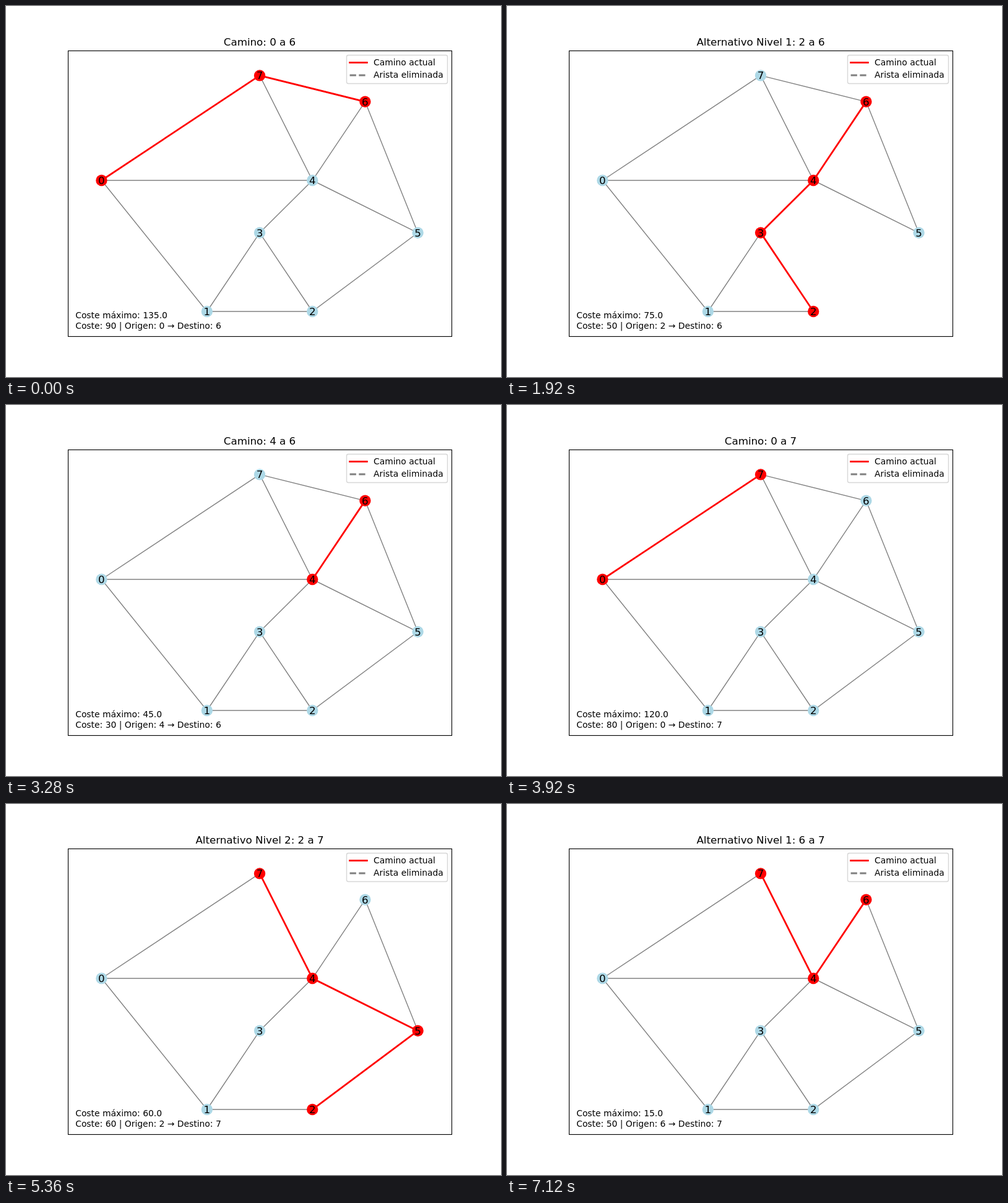
Animation of 800x600 px, one loop 7.2 s. Source, as an HTML page:

```html
<!DOCTYPE html>
<html lang="es">
<head>
<meta charset="utf-8">
<title>Caminos alternativos</title>
<style>
  html, body { margin: 0; width: 100%; height: 100%; overflow: hidden; background: #fff; }
  svg { display: block; width: 800px; height: 600px; }
  text { font-family: "DejaVu Sans", sans-serif; font-size: 13.89px; fill: #000; white-space: pre; }
  .big { font-size: 16.67px; text-anchor: middle; }
  .edge { stroke: #808080; stroke-width: 1.39; }
  .edge.on { stroke: #f00; stroke-width: 2.78; stroke-linecap: square; }
  .node { fill: #add8e6; }
  .node.on { fill: #f00; }
</style>
</head>
<body>
<svg id="stage" viewBox="0 0 800 600" xmlns="http://www.w3.org/2000/svg">
  <rect width="800" height="600" fill="#fff"/>
  <g id="edges"></g>
  <g id="nodes"></g>
  <rect x="100.5" y="72.5" width="620" height="462" fill="none" stroke="#000" stroke-width="1.11"/>
  <text id="title" class="big" x="410" y="63.8"></text>
  <text id="limit" x="112.2" y="505"></text>
  <text id="info" x="112.2" y="522"></text>
  <rect x="550.5" y="79.5" width="163" height="46" rx="2.8" fill="#fff" fill-opacity=".8" stroke="#ccc" stroke-opacity=".8" stroke-width="1.39"/>
  <path d="M555.6 91.5h27.8" stroke="#f00" stroke-width="2.78" stroke-linecap="square"/>
  <path d="M555.6 112h27.8" stroke="#808080" stroke-width="2.78" stroke-dasharray="10.28 4.44"/>
  <text x="594" y="96">Camino actual</text>
  <text x="594" y="116">Arista eliminada</text>
</svg>
<script>
const STEP = 80;
const MAX_LEVEL = 2;
const $ = id => document.getElementById(id);

// Grid position of each node
const grid = [[0, 4], [2, 9], [4, 9], [3, 6], [4, 4], [6, 6], [5, 1], [3, 0]];
const pos = grid.map(([x, y]) => [154.4 + x * 85.2, 112.4 + y * 42.4]);

// Edges: node, node, cost
const edges = [
  [0, 1, 40], [0, 4, 100], [0, 7, 80], [1, 2, 60], [1, 3, 10], [2, 3, 10], [2, 5, 10],
  [3, 4, 10], [4, 5, 30], [4, 6, 30], [4, 7, 20], [5, 6, 40], [6, 7, 10]
];

// Dijkstra grown from the destination; on ties the first one found stays
function shortest(from, to, cut) {
  const seen = new Map([[to, { cost: 0, next: -1, edge: -1 }]]);
  const done = new Set();
  for (;;) {
    let best = -1;
    for (const [n, s] of seen)
      if (!done.has(n) && (best < 0 || s.cost < seen.get(best).cost)) best = n;
    if (best < 0) return null;
    if (best === from) break;
    done.add(best);
    edges.forEach(([a, b, w], i) => {
      if (cut.includes(i) || (a !== best && b !== best)) return;
      const n = a === best ? b : a;
      const cost = seen.get(best).cost + w;
      if (!seen.has(n) || cost < seen.get(n).cost) {
        if (!done.has(n)) seen.set(n, { cost, next: best, edge: i });
      }
    });
  }
  const nodes = [], used = [];
  for (let n = from; n >= 0; n = seen.get(n).next) {
    nodes.push(n);
    if (n !== to) used.push(seen.get(n).edge);
  }
  return { cost: seen.get(from).cost, nodes, used };
}

const scenes = [];

// Show a path, then cut each of its edges in turn while the cost is allowed
function explore(from, to, cut = [], limit = 0) {
  const path = shortest(from, to, cut);
  if (!path) return;
  const level = cut.length;
  if (!level) limit = path.cost * 1.5;
  scenes.push({ from, to, cut, limit, level, ...path });
  if (level < MAX_LEVEL && path.cost <= limit)
    path.used.forEach(i => explore(from, to, [...cut, i], limit));
}

for (const to of [6, 7])
  for (let from = 0; from < to; from++) explore(from, to);

function add(parent, tag, attrs, text = "") {
  const el = document.createElementNS("http://www.w3.org/2000/svg", tag);
  for (const k in attrs) el.setAttribute(k, attrs[k]);
  el.textContent = text;
  return parent.appendChild(el);
}

const lines = edges.map(([a, b]) => add($("edges"), "line", {
  class: "edge", x1: pos[a][0], y1: pos[a][1], x2: pos[b][0], y2: pos[b][1]
}));
const dots = pos.map(([cx, cy]) => add($("nodes"), "circle", { class: "node", cx, cy, r: 9.2 }));
pos.forEach(([x, y], i) => add($("nodes"), "text", { class: "big", x, y: y + 5.8 }, i));

let shown = -1;

function draw(index) {
  if (index === shown) return;
  shown = index;
  const s = scenes[index];
  lines.forEach((el, i) => {
    el.classList.toggle("on", s.used.includes(i));
    el.style.display = s.cut.includes(i) ? "none" : "";
  });
  dots.forEach((el, i) => el.classList.toggle("on", s.nodes.includes(i)));
  const name = s.level ? `Alternativo Nivel ${s.level}` : "Camino";
  $("title").textContent = `${name}: ${s.from} a ${s.to}`;
  $("limit").textContent = `Coste máximo: ${s.limit.toFixed(1)}`;
  $("info").textContent = `Coste: ${s.cost} | Origen: ${s.from} → Destino: ${s.to}`;
}

function tick() {
  draw(Math.floor(performance.now() / STEP) % scenes.length);
  requestAnimationFrame(tick);
}
draw(0);
tick();
</script>
</body>
</html>
```
